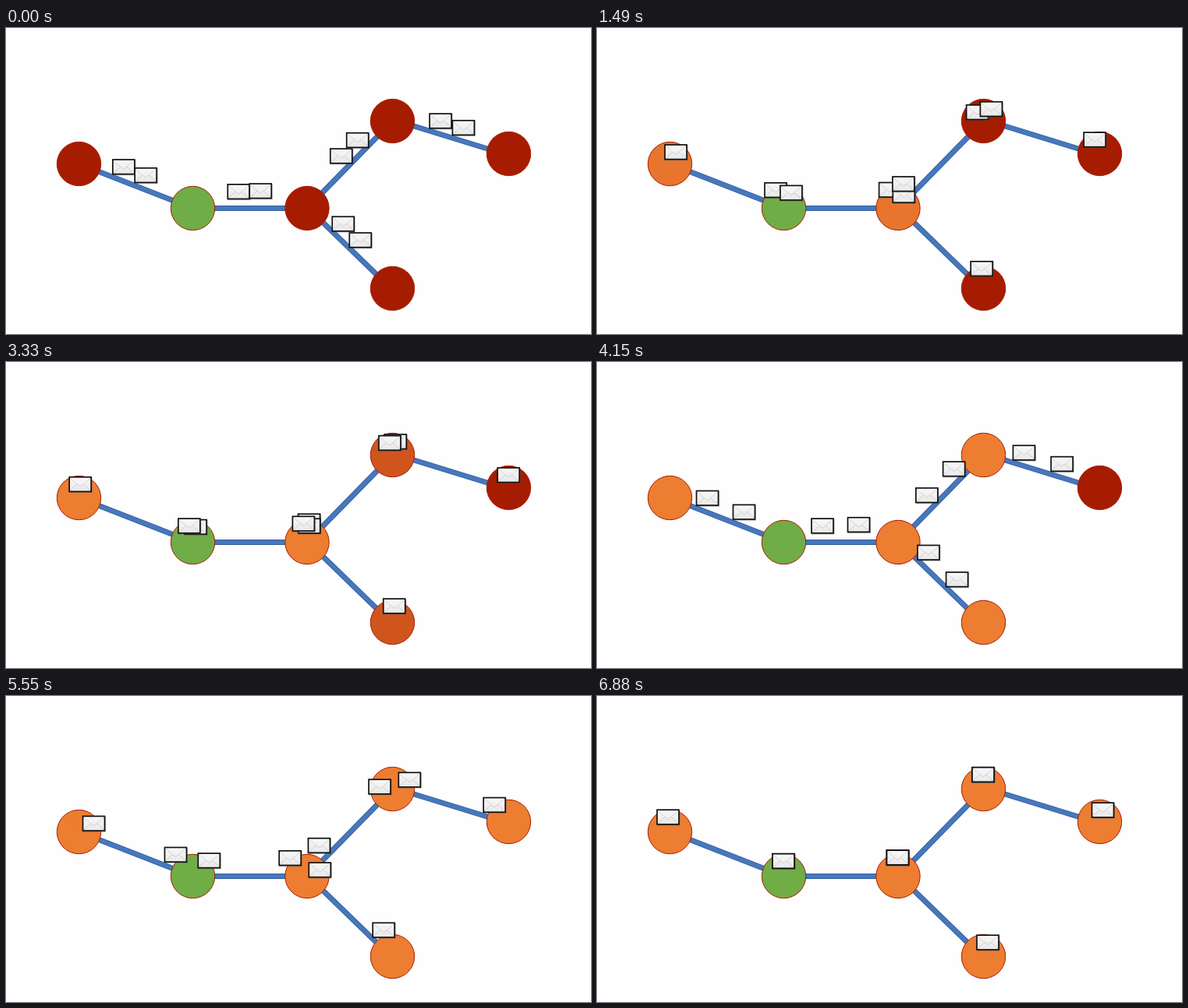
Animation, 750 px wide and 393 px high, one loop 9650 ms. Source, as an HTML page with a canvas:

```html
<!DOCTYPE html>
<html lang="en">
<head>
<meta charset="utf-8">
<title>Messages spreading through a network</title>
<style>
html, body { margin: 0; width: 100%; height: 100%; overflow: hidden; background: #fefefe; }
canvas { display: block; }
</style>
</head>
<body>
<canvas id="stage" width="750" height="393"></canvas>
<script>
const ctx = document.getElementById('stage').getContext('2d');
const LOOP = 9650, FIRST = -787, PERIOD = 1955, TRAVEL = 1750, FADE = 350;
const RED = [166, 28, 0], ORANGE = [237, 125, 49], GREEN = [112, 173, 71];

// x, y: disc centre; mx, my: envelope resting place; turn: round in which it turns orange
const left   = { x: 93.5,  y: 174.5, mx: 91,    my: 155.5, turn: 1 };
const source = { x: 239.5, y: 231.5, mx: 239,   my: 212 };
const middle = { x: 386,   y: 231.5, mx: 385.5, my: 207.5, turn: 1 };
const top_   = { x: 495.5, y: 119.5, mx: 495,   my: 101,   turn: 2 };
const bottom = { x: 495.5, y: 334.5, mx: 501,   my: 316.5, turn: 2 };
const right  = { x: 644.5, y: 161.5, mx: 648.5, my: 146.5, turn: 3 };
const nodes = [left, source, middle, top_, bottom, right];

// two ends, then a small vertical shift of the line at each end
const edges = [
  [left, source, 0, 0],
  [source, middle, 0, 0],
  [middle, bottom, -1.5, 2],
  [middle, top_, 0, 0],
  [top_, right, -2, 2],
];

// The picture advances in steps: [start, number of equal steps until the next start]
const cadence = [
  [0, 1], [120, 6], [1080, 1], [1290, 2], [1690, 3], [2240, 1], [2390, 6], [3330, 1],
  [3470, 4], [4150, 1], [4280, 1], [4430, 1], [4580, 5], [5550, 1], [5690, 7],
  [6730, 1], [6880, 1], [LOOP, 1],
];

const clamp = v => Math.min(1, Math.max(0, v));
const mix = (a, b, s) => a + (b - a) * s;
const ease = u => u < 0.5 ? 2 * u * u : 1 - 2 * (1 - u) ** 2;

function stepTime(t) {
  const i = cadence.findIndex(([start]) => start > t) - 1;
  const [start, count] = cadence[i];
  const step = (cadence[i + 1][0] - start) / count;
  return start + Math.floor((t - start) / step) * step;
}

function line(color, width, ...points) {
  ctx.strokeStyle = color;
  ctx.lineWidth = width;
  ctx.beginPath();
  points.forEach(([x, y]) => ctx.lineTo(x, y));
  ctx.stroke();
}

function drawEdge([a, b, shiftA, shiftB]) {
  const ends = [[a.x, a.y + shiftA], [b.x, b.y + shiftB]];
  line('#34609f', 7, ...ends);
  line('#4777bd', 5.2, ...ends);
}

function drawNode(node, t) {
  const s = clamp((t - FIRST - node.turn * PERIOD) / FADE);
  const color = node.turn ? RED.map((c, i) => mix(c, ORANGE[i], s)) : GREEN;
  ctx.fillStyle = `rgb(${color})`;
  ctx.strokeStyle = '#a61c00';
  ctx.lineWidth = 1;
  ctx.beginPath();
  ctx.arc(node.x, node.y, 28.2, 0, 2 * Math.PI);
  ctx.fill();
  ctx.stroke();
}

function drawEnvelope(a, b, s) {
  ctx.save();
  ctx.translate(mix(a.mx, b.mx, s), mix(a.my, b.my, s));
  ctx.fillStyle = 'rgba(90, 90, 90, .45)';
  ctx.fillRect(-14, -9, 29.5, 20);
  const paper = ctx.createLinearGradient(0, -9, 0, 9);
  paper.addColorStop(0, '#f8f8f8');
  paper.addColorStop(1, '#e9e9e9');
  ctx.fillStyle = paper;
  ctx.fillRect(-14, -9.5, 28, 19);
  line('#cfcfcf', 1, [-13, 8], [-4, 0], [0, 3], [4, 0], [13, 8]);
  line('#d4d4d4', 1, [-13, -8], [-4, 0]);
  line('#d4d4d4', 1, [13, -8], [4, 0]);
  ctx.strokeStyle = '#111';
  ctx.lineWidth = 1.7;
  ctx.strokeRect(-14, -9.3, 28, 18.6);
  ctx.restore();
}

function draw(t) {
  ctx.fillStyle = '#fefefe';
  ctx.fillRect(0, 0, 750, 393);
  edges.forEach(drawEdge);
  nodes.forEach(node => drawNode(node, t));

  const round = Math.min(3, Math.floor((t - FIRST) / PERIOD));
  const u = clamp((t - FIRST - round * PERIOD) / TRAVEL);
  const s = ease(u);
  // Swapping ends also swaps which envelopes lie on top
  const flipped = (round + (u >= 0.5)) % 2 === 0;
  for (const [a, b] of flipped ? [...edges].reverse() : edges) {
    drawEnvelope(a, b, s);
    drawEnvelope(b, a, s);
  }
}

function tick() {
  draw(stepTime(performance.now() % LOOP));
  requestAnimationFrame(tick);
}
tick();
</script>
</body>
</html>
```
